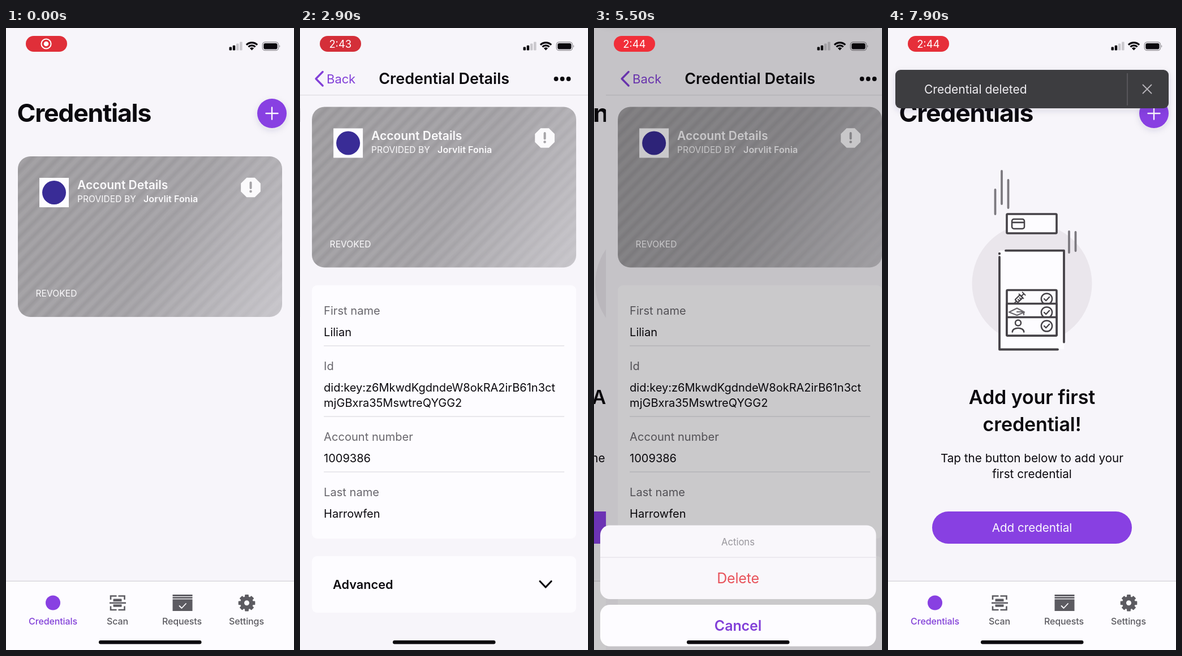
These frames come from a looping animation (509 by 1100 pixels, 8000 ms). An HTML page:

```html
<!DOCTYPE html>
<html lang="en">
<head>
<meta charset="utf-8">
<title>Credential wallet</title>
<style>
  html, body { margin: 0; width: 100%; height: 100%; overflow: hidden; background: #f7f5fa; }
  svg { display: block; width: 100vw; height: 100vh; }
  text { font-family: Inter, "Noto Sans", sans-serif; font-optical-sizing: none; white-space: pre; }
</style>
</head>
<body>
<svg id="stage" viewBox="0 0 509 1100" xmlns="http://www.w3.org/2000/svg"></svg>
<script>
const LOOP = 8000, STEP = 100;
const W = 509, H = 1100;
const INK = '#0b090e', GREY = '#68666c', TAB = '#5c5b61', PURPLE = '#8840e2', LINK = '#8240d8';
const PAGE = '#f7f5fa', PANEL = '#fdfcff', RULE = '#e3e1e6', LINE = '#454247';

const stage = document.getElementById('stage');
const $ = id => document.getElementById(id);

// ---- markup helpers ----
function text(x, y, str, size, { w = 400, fill = INK, ls = 0, mid = false } = {}) {
  return `<text x="${x}" y="${y}" font-size="${size}" font-weight="${w}" fill="${fill}"` +
    ` letter-spacing="${ls}"${mid ? ' text-anchor="middle"' : ''}>${str}</text>`;
}
function rect(x, y, x2, y2, r, fill, extra = '') {
  return `<rect x="${x}" y="${y}" width="${x2 - x}" height="${y2 - y}" rx="${r}" fill="${fill}" ${extra}/>`;
}
function circle(x, y, r, fill, extra = '') {
  return `<circle cx="${x}" cy="${y}" r="${r}" fill="${fill}" ${extra}/>`;
}
function stroke(d, color, width, extra = '') {
  return `<path d="${d}" fill="none" stroke="${color}" stroke-width="${width}"` +
    ` stroke-linecap="round" stroke-linejoin="round" ${extra}/>`;
}
function polar(x, y, r, deg) {
  const a = deg * Math.PI / 180;
  return `${(x + r * Math.cos(a)).toFixed(2)} ${(y + r * Math.sin(a)).toFixed(2)}`;
}
function polygon(x, y, n, radius, turn) {
  const pts = Array.from({ length: n }, (_, i) => polar(x, y, radius, turn + i * 360 / n));
  return 'M' + pts.join('L') + 'Z';
}

// ---- pieces ----
const defs = `<defs>
  <linearGradient id="cardTone" x1="0" y1="0" x2="467" y2="284" gradientUnits="userSpaceOnUse">
    <stop offset="0" stop-color="#a3a1a4"/><stop offset=".55" stop-color="#a9a7ab"/>
    <stop offset="1" stop-color="#cbc9ce"/>
  </linearGradient>
  <linearGradient id="stripeFade" x1="0" y1="0" x2="467" y2="284" gradientUnits="userSpaceOnUse">
    <stop offset=".4" stop-color="#fff"/><stop offset="1" stop-color="#333"/>
  </linearGradient>
  <linearGradient id="stripes" x1="0" y1="0" x2="11.67" y2="11.67" gradientUnits="userSpaceOnUse" spreadMethod="repeat">
    <stop offset="0" stop-color="#6f6d71" stop-opacity=".1"/>
    <stop offset=".21" stop-color="#6f6d71" stop-opacity=".2"/>
    <stop offset=".42" stop-color="#6f6d71" stop-opacity=".1"/>
    <stop offset=".58" stop-color="#6f6d71" stop-opacity="0"/>
    <stop offset=".84" stop-color="#6f6d71" stop-opacity="0"/>
    <stop offset="1" stop-color="#6f6d71" stop-opacity=".1"/>
  </linearGradient>
  <mask id="stripeMask"><rect width="467" height="284" fill="url(#stripeFade)"/></mask>
  <filter id="soft" x="-40%" y="-40%" width="180%" height="180%">
    <feDropShadow dx="0" dy="4" stdDeviation="6" flood-color="#3a2a55" flood-opacity=".13"/>
  </filter>
</defs>`;

function card(top) {
  const white = '#fbfafc';
  return `<g transform="translate(21 ${top})">` +
    rect(0, 0, 467, 284, 22, 'url(#cardTone)') +
    rect(0, 0, 467, 284, 22, 'url(#stripes)', 'mask="url(#stripeMask)"') +
    rect(38, 38, 90, 90, 0, '#fdfcff') + circle(64, 64, 21, '#392c96') +
    text(105, 58, 'Account Details', 21, { w: 600, fill: white }) +
    text(105, 81, 'PROVIDED BY', 15.5, { fill: white, ls: .1 }) +
    text(222, 81, 'Jorvlit Fonia', 16, { w: 600, fill: white, ls: .1 }) +
    `<path d="${polygon(411.5, 55, 8, 18.8, 22.5)}" fill="${white}"/>` +
    stroke('M411.5 46.5V56', '#a6a4a8', 4) + circle(411.5, 62, 2.3, '#a6a4a8') +
    text(31.5, 248, 'REVOKED', 15.5, { fill: white, ls: .1 }) + '</g>';
}

function gear(x, y) {
  let teeth = '';
  for (let i = 0; i < 8; i++) {
    teeth += rect(x - 3.4, y - 14.8, x + 3.4, y - 6, 1, TAB, `transform="rotate(${i * 45} ${x} ${y})"`);
  }
  return teeth + circle(x, y, 8, 'none', `stroke="${TAB}" stroke-width="7"`);
}

function scanIcon() {
  return `<path d="M185 1011V1004.5H195.5M198.5 1004.5H209.5V1011M185 1022.5V1029H195.5M198.5 1029H209.5V1022.5"
      fill="none" stroke="${TAB}" stroke-width="2.6"/>` +
    rect(189.5, 1009.5, 204.5, 1023.8, 1, TAB) +
    rect(189, 1014.2, 205, 1019.4, 0, PANEL) + rect(183, 1015.5, 212, 1018.1, 0, TAB);
}

function tabBar() {
  const label = (x, str, fill) => text(x, 1055, str, 16, { w: 500, fill, ls: -.12, mid: true });
  return rect(0, 978, W, H, 0, PANEL) + rect(0, 977.5, W, 979, 0, '#dad8de') +
    circle(83, 1016.5, 13, PURPLE) + scanIcon() +
    rect(294.5, 1002, 329.5, 1005, 0, TAB) + rect(294.5, 1006.2, 329.5, 1009, 0, TAB) +
    rect(294.5, 1010.3, 329.5, 1031, 0, TAB) +
    stroke('M306.5 1022L310.5 1026L318 1018', PANEL, 1.8) +
    gear(425.5, 1016.8) +
    label(83, 'Credentials', LINK) + label(197, 'Scan', TAB) +
    label(311, 'Requests', TAB) + label(425, 'Settings', TAB);
}

function tick(y) {
  return circle(280.5, y, 9.6, PANEL, `stroke="${LINE}" stroke-width="2.5"`) +
    stroke(`M276 ${y}l3.2 3.2l6 -6.4`, LINE, 2.3);
}

function emptyState() {
  const edge = `stroke="${LINE}" stroke-width="3.6"`;
  const dash = (x, y, y2) => stroke(`M${x} ${y}V${y2}`, '#7c797f', 3.8);
  const row = y => rect(210, y, 298, 544, 1.5, PANEL, edge);
  return circle(254.5, 452, 106, '#eae6ec') +
    dash(189.5, 286, 329) + dash(201, 253, 311) + dash(212.5, 269, 318) +
    dash(320, 360, 397) + dash(331.5, 361, 394) +
    rect(210, 329, 298, 363, 1.5, PANEL, edge) +
    rect(219, 338, 241, 355, 3.5, 'none', `stroke="${LINE}" stroke-width="2.5"`) +
    stroke('M220 343.8H240', LINE, 2.8) +
    rect(197, 393.5, 311, 568, 0, PANEL) +
    stroke('M197 405V568.5H300', LINE, 3.8) + stroke('M208 393.7H311V555.5', LINE, 3.8) +
    circle(197, 399, 2.2, LINE) +
    row(463.5) + tick(479) +
    `<g transform="rotate(45 232 478)">` +
      rect(228.5, 473, 235.5, 485, 1, 'none', `stroke="${LINE}" stroke-width="2.3"`) +
      stroke('M226.5 473H237.5M232 472V467M228.5 466.5H235.5M232 486V491M232 477H235M232 481H235', LINE, 2) + '</g>' +
    row(487.5) + tick(503) +
    stroke('M214 502.5L228 495.5L241 502.5L228 508ZM228 502H240V507', '#69666b', 2.2) +
    row(511.5) + tick(527) +
    circle(230, 521.5, 5, 'none', `stroke="${LINE}" stroke-width="2.5"`) +
    stroke('M219.8 537.5C220 528.5 240 528.5 240.2 537.5', LINE, 2.6) +
    text(254.5, 665, 'Add your first', 34, { w: 600, ls: -.1, mid: true }) +
    text(254.5, 713, 'credential!', 34, { w: 600, ls: -.1, mid: true }) +
    text(254.5, 768, 'Tap the button below to add your', 20.7, { mid: true }) +
    text(254.5, 796, 'first credential', 20.7, { mid: true }) +
    rect(78, 855, 431, 912, 28.5, PURPLE) +
    text(254.5, 891, 'Add credential', 20.6, { fill: '#fbf8ff', mid: true });
}

function listScreen() {
  return rect(0, 0, W, H, 0, PAGE) +
    text(19.5, 165.5, 'Credentials', 44.5, { w: 700, ls: -1.2 }) +
    circle(470, 151, 26, PURPLE, 'filter="url(#soft)"') +
    stroke('M459.5 151H480.5M470 140.5V161.5', '#fbf8ff', 2.4) +
    `<g id="held">${card(227)}</g><g id="empty">${emptyState()}</g>`;
}

function detailScreen() {
  const field = (y, name, ...lines) => text(42, y, name, 20, { fill: GREY, ls: .05 }) +
    lines.map((s, i) => text(42, y + 38 + i * 27.3, s, 20)).join('');
  const rule = y => rect(42, y - .7, 467, y + .8, 0, RULE);
  return rect(0, 0, W, H, 0, PAGE) + rect(0, 118, W, 119.3, 0, '#dfdde2') +
    stroke('M40 77.5L28 89.7L40 102', LINK, 3.4) +
    text(47, 97.5, 'Back', 22, { fill: LINK, ls: -.1 }) +
    text(254.5, 99, 'Credential Details', 27, { w: 600, mid: true }) +
    [452.5, 463.5, 474.5].map(x => circle(x, 90, 3.9, INK)).join('') +
    card(139.5) +
    rect(21, 455, 488, 903, 9, PANEL) +
    field(507, 'First name', 'Lilian') + rule(562) +
    field(605, 'Id', 'did:key:z6MkwdKgdndeW8okRA2irB61n3ct', 'mjGBxra35MswtreQYGG2') + rule(687) +
    field(730, 'Account number', '1009386') + rule(785) +
    field(828, 'Last name', 'Harrowfen') +
    rect(21, 934, 488, 1034, 9, PANEL) +
    text(58, 992, 'Advanced', 21.7, { w: 600 }) +
    stroke('M424 978.5L434 989L444 978.5', INK, 3.2);
}

function statusIcons() {
  const bars = [6, 8.7, 12, 15].map((h, i) =>
    rect(394.5 + i * 6.2, 39.5 - h, 399 + i * 6.2, 39.5, 1.2, i < 2 ? INK : '#cac8cd')).join('');
  const arc = r => `<path d="M${polar(434.5, 39.5, r, -135)}A${r} ${r} 0 0 1 ${polar(434.5, 39.5, r, -45)}"
    fill="none" stroke="${INK}" stroke-width="3.2"/>`;
  return bars + arc(13.6) + arc(8.6) +
    `<path d="M434.5 39.5L${polar(434.5, 39.5, 5.2, -135)}A5.2 5.2 0 0 1 ${polar(434.5, 39.5, 5.2, -45)}Z" fill="${INK}"/>` +
    rect(453.3, 25, 481.5, 39.5, 4.6, 'none', 'stroke="#969499" stroke-width="1.4"') +
    rect(455.3, 27, 479.5, 37.5, 2.8, INK) +
    '<path d="M483 30Q485.6 32.2 483 34.6Z" fill="#969499"/>';
}

function sheetPanels() {
  return rect(11, 829, 498.5, 959.5, 17, '#f9f7fb') + rect(11, 885, 498.5, 886.3, 0, '#e5e2e9') +
    text(254.5, 864.3, 'Actions', 16.6, { fill: '#98969c', mid: true }) +
    text(254.5, 931.5, 'Delete', 25, { fill: '#e8525a', ls: -.2, mid: true }) +
    rect(11, 969.5, 498.5, 1043, 17, PANEL) +
    text(254.5, 1015, 'Cancel', 25, { w: 600, fill: LINK, ls: -.1, mid: true });
}

function toastBox() {
  return rect(13, 74, 496, 142, 9, '#3d3c41', 'filter="url(#soft)"') +
    text(64, 116, 'Credential deleted', 21, { fill: '#f0eef2' }) +
    rect(422.4, 80, 423.6, 137, 0, '#69686d') +
    stroke('M450.5 100.5L465.5 115.5M465.5 100.5L450.5 115.5', '#b6b4b9', 1.8);
}

stage.innerHTML = defs +
  `<g id="list">${listScreen()}</g><g id="tabs">${tabBar()}</g>` +
  `<g id="detail">${detailScreen()}</g><g>${statusIcons()}</g>` +
  rect(0, 0, W, H, 0, '#000', 'id="dim"') +
  `<g id="sheet">${sheetPanels()}</g><g id="toast">${toastBox()}</g>` +
  rect(35, 14, 108, 42, 14, '#dc2f39', 'id="pill"') +
  `<g id="rec">${circle(71, 28, 8.6, 'none', 'stroke="#fff" stroke-width="2"')}${circle(71, 28, 4.3, '#fff')}</g>` +
  `<text id="clock" x="71.3" y="34.5" font-size="18.4" fill="#fff" text-anchor="middle"></text>` +
  rect(164, 1083, 345.5, 1089.5, 3.2, INK) +
  `<g id="touch"><circle id="halo" fill="#fefdff"/><circle id="dot" r="14.5" fill="#13e6f7"/></g>`;

// ---- motion ----
const clamp = v => Math.min(1, Math.max(0, v));
const ramp = (t, from, to) => clamp((t - from) / (to - from));
// Remaining distance (1 to 0) of a critically damped spring.
function settle(t, start, omega) {
  const p = Math.max(0, t - start) / 1000 * omega;
  return (1 + p) * Math.exp(-p);
}
const move = (id, x, y) => $(id).setAttribute('transform', `translate(${x.toFixed(2)} ${y.toFixed(2)})`);
const show = (id, on) => { $(id).style.display = on ? '' : 'none'; };

const PUSH = 2440, ASK = 4110, CLOSE = 5410, POP = 5484, TOAST = 5500;
const TAP = 400;
const taps = [
  { at: 2230, x: 313, y: 371 },
  { at: 3810, x: 464.5, y: 92.5 },
  { at: 4670, x: 257, y: 922.5 }
];

function draw(t) {
  const popped = t >= POP;
  const away = popped ? settle(t, POP, 20) : 1 - settle(t, PUSH, 24);
  move('list', -.3 * W * away, 0);
  move('tabs', popped && away < .03 ? 0 : -.3 * W * away, 0);
  move('detail', W * (1 - away), 0);
  show('detail', away > .02);
  show('held', !popped);
  show('empty', popped);

  const closing = ramp(t, CLOSE, CLOSE + 210);
  $('dim').setAttribute('opacity', .36 * ramp(t, ASK, ASK + 220) * (1 - closing));
  move('sheet', 0, 275 * Math.max(settle(t, 4190, 18), closing * closing));
  show('sheet', t > ASK && closing < 1);

  const s = (t - TOAST) / 1000;
  move('toast', 0, -150 * Math.exp(-12 * s) * Math.cos(7 * s));
  show('toast', s >= 0);

  const glow = Math.cos((t - 5550) / 2000 * 2 * Math.PI);
  $('pill').setAttribute('fill', `rgb(${Math.round(221 + 20 * glow)},47,57)`);
  show('rec', t < 2600);
  $('clock').textContent = t < 2600 ? '' : t < 3500 ? '2:43' : '2:44';

  const tap = taps.find(k => t >= k.at && t < k.at + TAP);
  show('touch', !!tap);
  if (tap) {
    move('touch', tap.x, tap.y);
    $('halo').setAttribute('r', 75.5 - 60 * (t - tap.at) / TAP);
  }
}

function tickFrame() {
  const t = (performance.now() + 10) % LOOP;
  draw(Math.floor(t / STEP) * STEP);
  requestAnimationFrame(tickFrame);
}
draw(0);
requestAnimationFrame(tickFrame);
</script>
</body>
</html>
```
